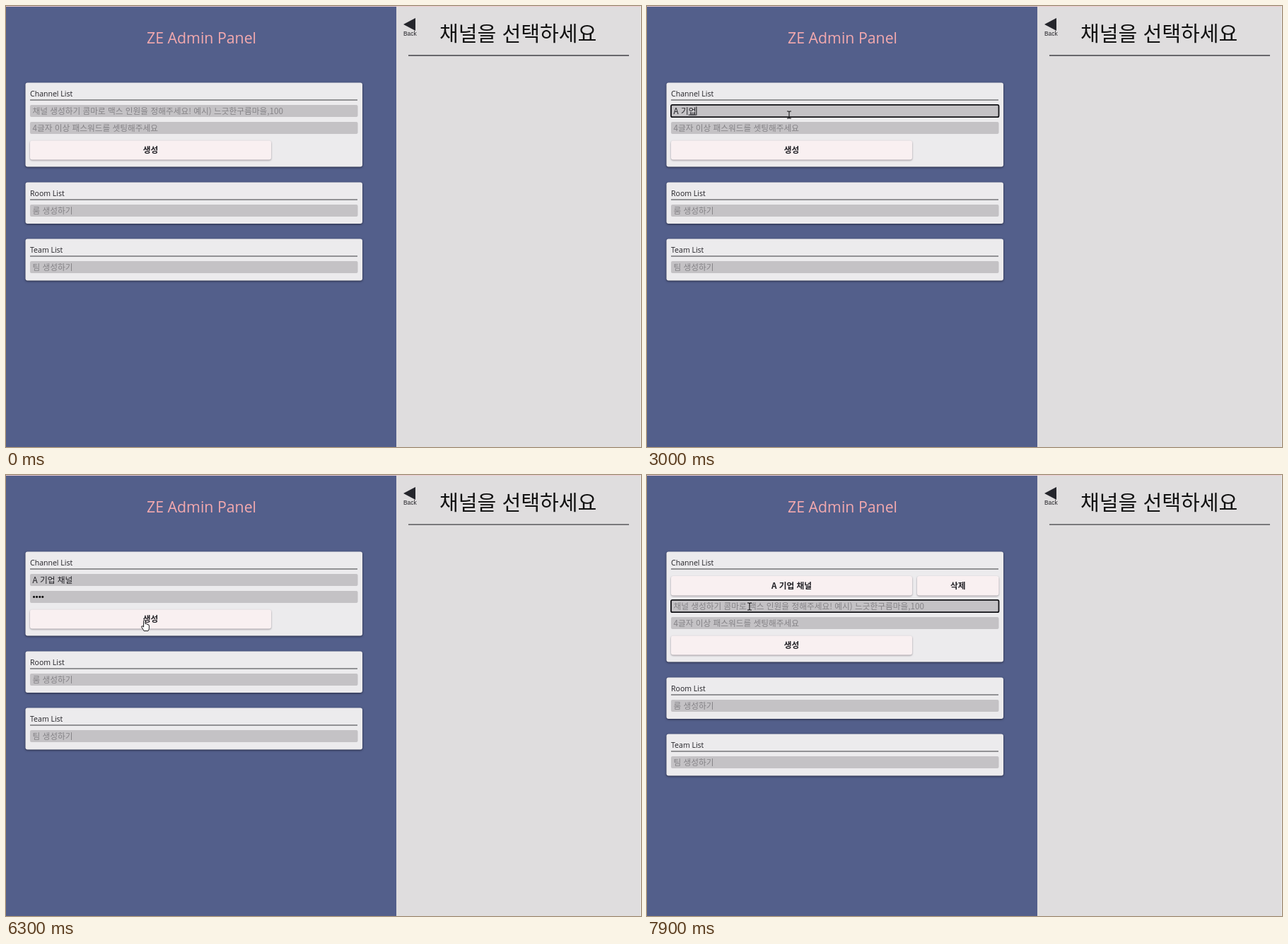
These frames come from a looping animation (898x624 px, 8 s). An HTML page:

```html
<!DOCTYPE html>
<html lang="ko">
<head>
<meta charset="utf-8">
<title>Admin Panel</title>
<style>
  html, body { margin: 0; width: 100%; height: 100%; overflow: hidden; background: #dfddde; }
  svg { display: block; width: 898px; height: 624px; }
  text { white-space: pre; font: 11.7px "Noto Sans CJK KR", "Noto Sans CJK JP", sans-serif; fill: #222126; }
  .title { font: 21.3px "Open Sans", sans-serif; fill: #f3a9ae; text-anchor: middle; }
  .head { font-size: 29.1px; font-weight: 350; fill: #111; }
  .label { font: 10.55px "Open Sans", sans-serif; }
  .back { font: 8.4px "Liberation Sans", sans-serif; }
  .hint { fill: #858387; }
  .dots { font-family: "Liberation Sans", sans-serif; fill: #111; }
  .btn text { font-weight: 700; text-anchor: middle; }
  .card { fill: #ecebed; filter: drop-shadow(0 1px 1.5px rgba(20, 22, 40, .75)); }
  .btn rect { fill: #f9f0f1; filter: drop-shadow(0 1.5px 1.2px rgba(70, 60, 70, .5)); }
  .field { fill: #c4c2c5; }
  .rule { fill: #3b3a3f; }
</style>
</head>
<body>
<svg viewBox="0 0 898 624">
  <rect width="898" height="624" fill="#dfddde"/>
  <rect width="552" height="624" fill="#535f8b"/>
  <rect width="898" height="1" fill="#ecccd0"/>
  <rect x="897" width="1" height="624" fill="#ecebec"/>
  <text class="title" x="276.5" y="53">ZE Admin Panel</text>
  <path d="M562 26 L579 17 V35 Z" fill="#25262c"/>
  <text class="back" x="562" y="42">Back</text>
  <text class="head" x="613" y="50.4">채널을 선택하세요</text>
  <rect id="headRule" x="569" y="69" width="312" height="2" fill="#68676b"/>
  <g id="page"></g>
  <g id="beam" fill="none" stroke="#161619" stroke-width="1.1">
    <path d="M-3 -5 H-1 L0 -4.3 L1 -5 H3 M0 -4.3 V4.3 M-3 5 H-1 L0 4.3 L1 5 H3"/>
  </g>
  <path id="arrow" d="M0 0 V13 L3 10.3 L5 15 L7 14 L5 9.5 H9 Z" fill="#fff" stroke="#161619" stroke-width=".9"/>
  <path id="hand" fill="#fff" stroke="#161619" stroke-width="1" stroke-linejoin="round"
    d="M-2.4 2 V-6.5 Q-2.4 -8 -1.2 -8 Q0 -8 0 -6.5 V-2.5 Q1.6 -3.6 2.2 -1.8 Q3.6 -2.6 4 -1 Q5.4 -1.4 5.4 .3 V3.5 Q5.4 5.6 4 7.6 H-2 Q-3 5.4 -5.2 2.5 Q-5.8 .6 -4 .7 Z"/>
</svg>
<script>
const LOOP = 8000, STEP = 100, GROW = 37;
const $ = id => document.getElementById(id);

const card = (y, h, name, id = '') => `
  <rect class="card" id="${id}" x="27.5" y="${y}" width="476.5" height="${h}" rx="3"/>
  <text class="label" x="34" y="${y + 19.5}">${name}</text>
  <rect class="rule" x="34" y="${y + 24}" width="463" height="1"/>`;

const field = (y, hint, id = '') => `
  <rect class="field" x="34" y="${y}" width="463.5" height="17" rx="2"/>
  <text class="hint" id="${id}Hint" x="37.5" y="${y + 12.6}">${hint}</text>`;

const button = (x, y, w, h, name) => `<g class="btn">
  <rect x="${x}" y="${y}" width="${w}" height="${h}" rx="3"/>
  <text x="${x + w / 2}" y="${y + h / 2 + 3.8}">${name}</text></g>`;

$('page').innerHTML = card(108.5, 119, 'Channel List', 'mainCard') + `
  <g id="made">${button(34, 143, 341, 27.5, 'A 기업 채널')}${button(382, 143, 115.5, 27.5, '삭제')}</g>
  <g id="low">
    ${field(140, '채널 생성하기 콤마로 맥스 인원을 정해주세요! 예시) 느긋한구름마을,100', 'name')}
    ${field(164, '4글자 이상 패스워드를 셋팅해주세요', 'pass')}
    <text id="name" x="37.5" y="152.6"></text>
    <text id="pass" class="dots" x="37.5" y="176"></text>
    <rect id="under" y="153.6" height="1" fill="#222126"/>
    <rect id="ring" x="34" width="463.5" height="17.4" rx="2" fill="none" stroke="#111115" stroke-width="1.8"/>
    <rect id="caret" width="1" height="12" fill="#111115"/>
    ${button(34, 190.5, 341, 27, '생성')}
    ${card(249.5, 58.5, 'Room List')}${field(281, '룸 생성하기')}
    ${card(329.5, 59, 'Team List')}${field(361, '팀 생성하기')}
  </g>`;

// time, committed text, syllable being composed
const typing = [
  [0, '', ''], [1500, 'A', ''], [1900, 'A ', ''], [2100, 'A ', 'ㄱ'], [2300, 'A ', '기'],
  [2500, 'A ', '깅'], [2700, 'A 기', '어'], [2900, 'A 기', '업'], [3200, 'A 기업 ', ''],
  [3600, 'A 기업 ', 'ㅊ'], [3800, 'A 기업 ', '채'], [4200, 'A 기업 ', '챈'],
  [4300, 'A 기업 채', '너'], [4400, 'A 기업 채', '널'], [4700, 'A 기업 채널', ''], [6400, '', '']
];
const secret = [[0, 0], [5500, 1], [5600, 2], [5700, 3], [5800, 4], [6400, 0]];
const focus = [[0, ''], [800, 'name'], [5100, 'pass'], [6200, ''], [7000, 'name']];
const path = [
  [200, 232, 325], [600, 201, 154], [4700, 201, 154], [5000, 188, 178], [5800, 188, 178],
  [6100, 197, 213], [6300, 197, 213], [6400, 195, 208], [6600, 195, 208], [6900, 145, 186]
];
const shapes = [[0, ''], [200, 'arrow'], [500, 'beam'], [6000, 'hand'], [6400, 'beam']];

const at = (table, t) => table.findLast(row => row[0] <= t);
const show = (id, on) => $(id).style.display = on ? '' : 'none';
const set = (id, attrs) => {
  for (const key in attrs) $(id).setAttribute(key, attrs[key]);
};

function pointer(t) {
  const i = path.findIndex(p => p[0] > t);
  if (i === 0) return path[0].slice(1);
  if (i < 0) return path.at(-1).slice(1);
  const [a, b] = [path[i - 1], path[i]];
  const k = (t - a[0]) / (b[0] - a[0]), e = k * k * (3 - 2 * k);
  return [a[1] + (b[1] - a[1]) * e, a[2] + (b[2] - a[2]) * e];
}

function drawFocus(t, typed, count) {
  const [since, target] = at(focus, t);
  show('ring', target);
  const lastKey = Math.max(since, typed[0] <= t ? typed[0] : 0, at(secret, t)[0]);
  show('caret', target && (t - lastKey) % 1000 < 500);
  if (!target) return;
  const y = target === 'name' ? 139.8 : 163.6;
  const filled = target === 'name' ? typed[1] + typed[2] : count;
  const width = filled ? $(target).getComputedTextLength() : 0;
  set('ring', { y });
  set('caret', { x: 37.5 + width, y: y + 2.7 });
}

function draw(t) {
  const made = t >= 6400;
  show('made', made);
  set('mainCard', { height: made ? 119 + GROW : 119 });
  set('low', { transform: `translate(0 ${made ? GROW : 0})` });
  set('headRule', t < 4400 ? { y: 69, height: 2, fill: '#68676b' } : { y: 69.5, height: 1.2, fill: '#39383c' });

  const typed = at(typing, t), [, done, part] = typed;
  const name = $('name');
  name.textContent = done;
  const start = done ? name.getComputedTextLength() : 0;
  name.textContent = done + part;
  show('under', part);
  if (part) set('under', { x: 37.5 + start, width: name.getComputedTextLength() - start });
  show('nameHint', !(done + part));

  const count = at(secret, t)[1];
  $('pass').textContent = '•'.repeat(count);
  show('passHint', !count);
  drawFocus(t, typed, count);

  const shape = at(shapes, t)[1], [x, y] = pointer(t);
  for (const id of ['beam', 'arrow', 'hand']) show(id, id === shape);
  if (shape) set(shape, { transform: `translate(${x} ${y})` });
}

const begin = performance.now();
function tick() {
  const t = (performance.now() - begin) % LOOP;
  draw(Math.floor(t / STEP) * STEP);
  requestAnimationFrame(tick);
}
tick();
</script>
</body>
</html>
```
